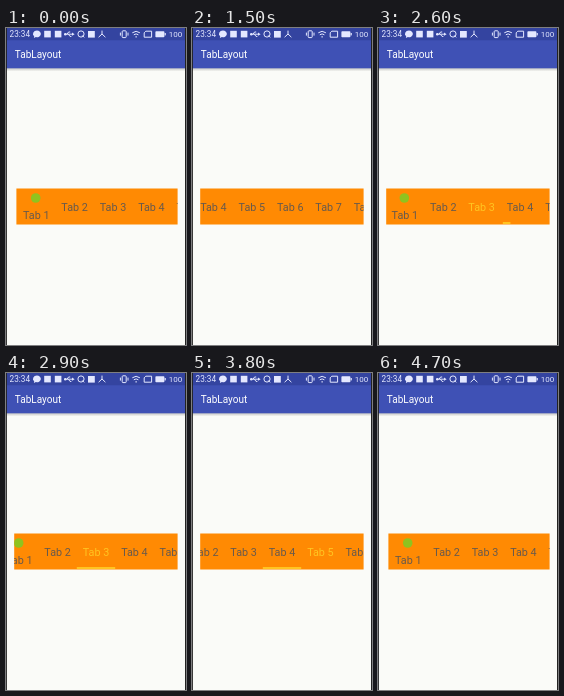
An HTML page for the animation above (5700 ms loop, 180 by 317 pixels).

```html
<!DOCTYPE html>
<html lang="en">
<head>
<meta charset="utf-8">
<title>TabLayout</title>
<style>
  html, body { margin: 0; width: 100%; height: 100%; overflow: hidden; background: #fafbf8; }
  svg { display: block; width: 100vw; height: 100vh; }
  text { font-family: Roboto, sans-serif; }
  .tab { font-size: 10.8px; text-anchor: middle; fill: #685a4d; }
  .tab.on { fill: #ffc421; }
  .line { fill: none; stroke: #e4e8ff; stroke-width: 1; }
  .solid { fill: #e4e8ff; }
</style>
</head>
<body>
<svg viewBox="0 0 180 317" preserveAspectRatio="none">
  <defs>
    <linearGradient id="shade" x2="0" y2="1">
      <stop stop-color="#000" stop-opacity=".22"/>
      <stop offset="1" stop-color="#000" stop-opacity="0"/>
    </linearGradient>
    <clipPath id="view"><rect x="8.2" y="160" width="163.4" height="40"/></clipPath>
  </defs>

  <rect width="180" height="317" fill="#fafbf8"/>
  <rect y="40" width="180" height="3.5" fill="url(#shade)"/>
  <rect y="12" width="180" height="28.3" fill="#3f51b5"/>
  <rect width="180" height="12.3" fill="#3444a0"/>
  <text x="8.8" y="30" font-size="10" fill="#fff">TabLayout</text>

  <g class="solid">
    <text x="3.6" y="9.4" font-size="8.2">23:34</text>
    <path d="M30.9 2.6a4 3.3 0 1 1-1 6.5l-2 1 .3-1.8a4 3.3 0 0 1 2.7-5.7z"/>
    <rect x="38.2" y="2.8" width="6.6" height="6.6"/>
    <rect x="48.8" y="2.8" width="6.6" height="6.6"/>
    <circle cx="59.3" cy="6.2" r="1.3"/>
    <path d="M66 4.6l2.6 1.6-2.6 1.6z"/>
    <rect x="82" y="3" width="6.8" height="6.6"/>
    <rect x="149.4" y="3.2" width="9" height="6" rx=".8"/>
    <rect x="158.6" y="5" width="1.2" height="2.4"/>
    <text x="162.8" y="9.2" font-size="8">100</text>
  </g>
  <g class="line">
    <path d="M59 6.2h7M61 6.2l1.6-2.2h1.6M62.4 6.2l1.6 2.2h1.4"/>
    <circle cx="75" cy="6" r="3.1"/>
    <path d="M76.2 7.4l2 2M96 2.6v3.4l-3.4 3.2M96 6l3.4 3.2"/>
    <rect x="116.2" y="2.8" width="4" height="6.8" rx=".8"/>
    <path d="M114.4 4.6v3M122 4.6v3"/>
    <path d="M126.3 4.8q3.8-3 7.6 0M127.8 6.8q2.3-1.8 4.6 0M130.1 8v1.6"/>
    <path d="M139.8 3.2h5.8v6h-7.4v-4.4z"/>
  </g>

  <g clip-path="url(#view)">
    <g id="strip">
      <rect id="fill" y="160.5" height="36" fill="#ff8a03"/>
      <circle cx="29.7" cy="170" r="4.8" fill="#8fc31f"/>
      <g id="tabs"></g>
      <rect id="bar" y="194" height="2" fill="#ffc421"/>
    </g>
  </g>

  <path d="M.4 0v317M179.5 0v317" stroke="#222"/>
</svg>

<script>
const LOOP = 5700, STEP = 100, RESET = 4700;
const COUNT = 9, START = 11, WIDTH = 38.4, MIDDLE = 90, GAP = 12, SLIDE = 300;
const FIRST = 8;

// Finger scroll: time, offset
const drag = [
  [1000, 0], [1100, 14], [1200, 48], [1300, 84], [1400, 110], [1500, 124],
  [1600, 130], [1700, 130], [1800, 100], [1900, 36], [2000, 0]
];
// Taps: press time, slide start, tab index
const taps = [[2000, 2530, 2], [3100, 3162, 3], [3700, 3850, 4], [4200, 4233, 5]];

const $ = id => document.getElementById(id);
const set = (el, attrs) => {
  for (const key in attrs) el.setAttribute(key, attrs[key]);
};
const mix = (a, b, p) => a + (b - a) * p;
const left = i => START + i * WIDTH;
const centred = i => left(i) + WIDTH / 2 - MIDDLE;

// cubic-bezier(.4, 0, .2, 1)
function ease(x) {
  if (x <= 0) return 0;
  if (x >= 1) return 1;
  let lo = 0, hi = 1;
  for (let n = 0; n < 20; n++) {
    const s = (lo + hi) / 2, r = 1 - s;
    if (1.2 * r * r * s + 0.6 * r * s * s + s * s * s < x) lo = s;
    else hi = s;
  }
  return lo * lo * (3 - 2 * lo);
}

function dragged(t) {
  const i = drag.findIndex(point => point[0] > t);
  if (i < 1) return 0;
  const [t0, a] = drag[i - 1], [t1, b] = drag[i];
  return mix(a, b, (t - t0) / (t1 - t0));
}

function stateAt(t) {
  let selected = FIRST, scroll = dragged(t);
  let from = left(FIRST), to = from + WIDTH;
  if (t >= RESET) return { selected, scroll, from, to };
  let current = FIRST;
  for (const [press, start, index] of taps) {
    if (t >= press) selected = index;
    if (t < start) break;
    const p = ease((t - start) / SLIDE);
    const target = left(index), end = target + WIDTH;
    // A distant tab's bar grows in from beside its target
    if (Math.abs(index - current) > 1) from = to = end + GAP;
    from = mix(from, target, p);
    to = mix(to, end, p);
    scroll = mix(scroll, centred(index), p);
    current = index;
  }
  return { selected, scroll, from, to };
}

const labels = Array.from({ length: COUNT }, (_, i) => {
  const label = document.createElementNS("http://www.w3.org/2000/svg", "text");
  set(label, { x: left(i) + WIDTH / 2, y: i ? 183.2 : 191 });
  label.textContent = "Tab " + (i + 1);
  return $("tabs").appendChild(label);
});
set($("fill"), { x: START - 0.6, width: COUNT * WIDTH });

function draw(now) {
  const t = Math.floor((now % LOOP) / STEP) * STEP;
  const { selected, scroll, from, to } = stateAt(t);
  set($("strip"), { transform: `translate(${-scroll} 0)` });
  set($("bar"), { x: from, width: to - from });
  labels.forEach((label, i) => set(label, { class: i === selected ? "tab on" : "tab" }));
}

const began = performance.now();
function tick() {
  draw(performance.now() - began);
  requestAnimationFrame(tick);
}
tick();
</script>
</body>
</html>
```
